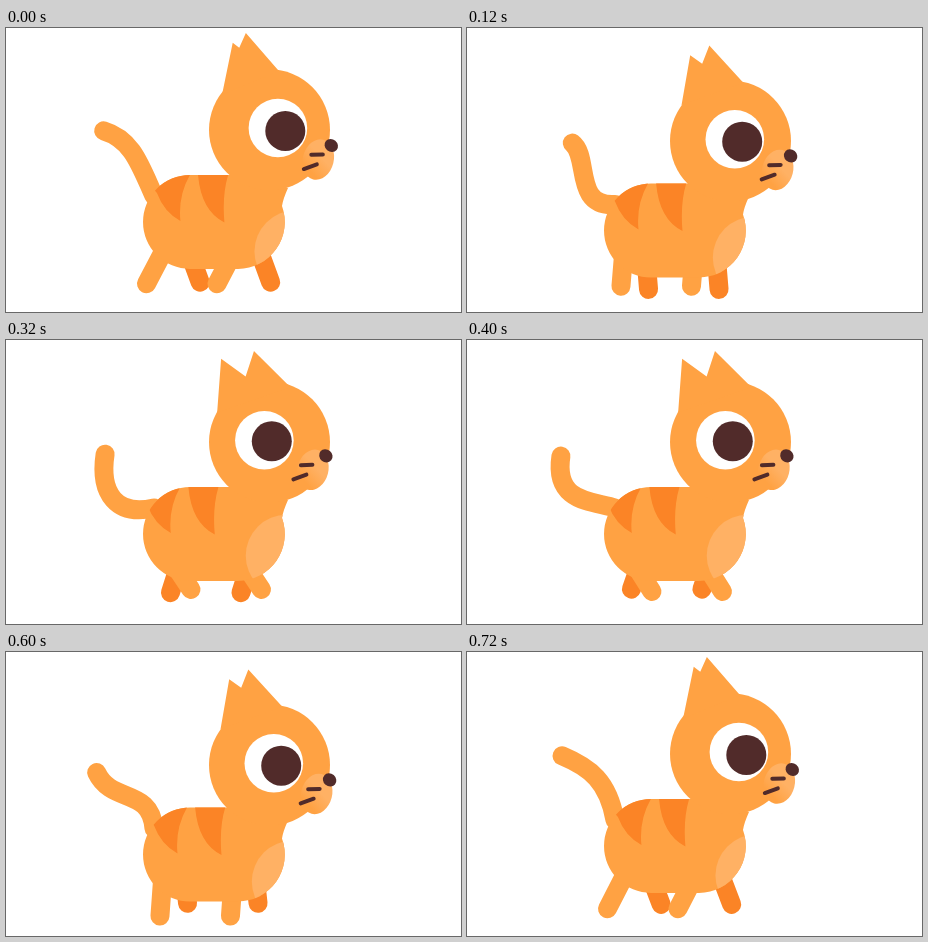
Animation of 455 by 284 pixels, one loop 0.76 s. Source, as an HTML page with a canvas:

```html
<!DOCTYPE html>
<html>
<head>
<meta charset="utf-8">
<title>Walking cat</title>
<style>
  html, body { margin: 0; width: 100%; height: 100%; overflow: hidden; background: #fff; }
  canvas { display: block; }
</style>
</head>
<body>
<canvas id="stage" width="455" height="284"></canvas>
<script>
const ctx = document.getElementById('stage').getContext('2d');
const LOOP = 760, STEP = 40;
const ORANGE = '#ffa243', DARK = '#fb8426', LIGHT = '#ffb164', BROWN = '#512b2a';

// Cosines and sine of the walk cycle; every part swings with these
let c1, c2, c3, s1;

function setPhase(t) {
  const angle = 2 * Math.PI * (t + 20) / LOOP;
  [c1, c2, c3] = [1, 2, 3].map(k => Math.cos(k * angle));
  s1 = Math.sin(angle);
}

// A value that swings around its mean
const swing = (mean, cos, sin = 0, cos2 = 0) => mean + cos * c1 + sin * s1 + cos2 * c2;

function ellipse(color, x, y, rx, ry = rx, turn = 0) {
  ctx.fillStyle = color;
  ctx.beginPath();
  ctx.ellipse(x, y, rx, ry, turn, 0, 7);
  ctx.fill();
}

function fill(color, path) {
  ctx.fillStyle = color;
  ctx.fill(new Path2D(path));
}

function line(color, width, path) {
  ctx.strokeStyle = color;
  ctx.lineWidth = width;
  ctx.lineCap = 'round';
  ctx.stroke(new Path2D(path));
}

function drawLegs(color, hip, x, y) {
  for (const dx of [0, 70.5])
    line(color, 19, `M${hip + dx} 210L${x + dx} ${y}`);
}

function drawTail() {
  const low = [swing(124, 10, -21, 4), swing(154, -18, 24, -3)];
  const high = [swing(107, 18, 9.5), swing(139, -23, -13, -3)];
  const tip = [swing(97.3, 0, 8, -1), swing(110.7, -6, -3, -1.5)];
  line(ORANGE, 19, `M148 168C${[low, high, tip]}`);
}

function drawBody() {
  const body = new Path2D('M184 147H262V160H282Q277 171 276 178A47 47 0 0 1 232 241H184A47 47 0 0 1 184 147Z');
  ctx.save();
  ctx.fillStyle = ORANGE;
  ctx.fill(body);
  ctx.clip(body);
  ellipse(LIGHT, swing(285, 4.5), swing(219.5, 4), 41);
  ctx.translate(5 * c1, 0);
  fill(DARK, 'M140 158L146 165Q153 184 169.5 193Q167 168 179 147V140Z');
  fill(DARK, 'M187 146Q190 183 213.5 194.5Q211 167 217.5 146Z');
  ctx.restore();
}

function drawHead() {
  ellipse(ORANGE, 263.5, swing(103.4, 0, 0, -1.6), 60.5);
  const ears = [
    [swing(213.5, 2.5), swing(70, -3)],
    [swing(220.8, 6), swing(18.3, -1.9, 0, -1.7)],
    [swing(236.5, -3.3), swing(29.7, -8.5, 0, -1.5)],
    [swing(244, -4.2), swing(9.3, -3, 0, -1.5)],
    [swing(279, -6), swing(46.5, -2, 0, -1.2)]
  ];
  fill(ORANGE, `M${ears.join('L')}Z`);

  const eyeX = swing(265, 7), eyeY = swing(101.6, 0, 0, -1.7);
  ellipse('#fff', eyeX, eyeY, 29.3);
  ellipse(BROWN, eyeX + 7.4, eyeY + 2 + c1, 20);

  ctx.save();
  ctx.translate(2.8 * c1, swing(0, 1, 0, -1.5));
  const muzzle = ctx.createLinearGradient(300, 142, 313, 130);
  muzzle.addColorStop(0, ORANGE);
  muzzle.addColorStop(1, LIGHT);
  ellipse(muzzle, 309.5, 132, 15.5, 20.5, 0.25);
  ellipse(BROWN, 322.5, 118, 7, 6.3, 0.7);
  ctx.translate(2.6 * c1, 0);
  line(BROWN, 4, 'M300 127.3L311.5 127M292.5 141.5L305.5 136.8');
  ctx.restore();
}

function draw(t) {
  setPhase(t);
  ctx.clearRect(0, 0, 455, 284);
  ctx.save();
  ctx.translate(0, swing(4.5, 0.6, 0, -5.2) - 0.25 * c3);
  drawLegs(DARK, 178, swing(177, 15.2, 0, 2.3), swing(249.5, 1, 5.5, 3));
  drawTail();
  drawLegs(ORANGE, 161 + 4 * c3, swing(163.2, -23), swing(252.3, 2.9, -3.2, 1.2));
  drawBody();
  drawHead();
  ctx.restore();
}

function tick() {
  draw(Math.floor(performance.now() % LOOP / STEP) * STEP);
  requestAnimationFrame(tick);
}
tick();
</script>
</body>
</html>
```
